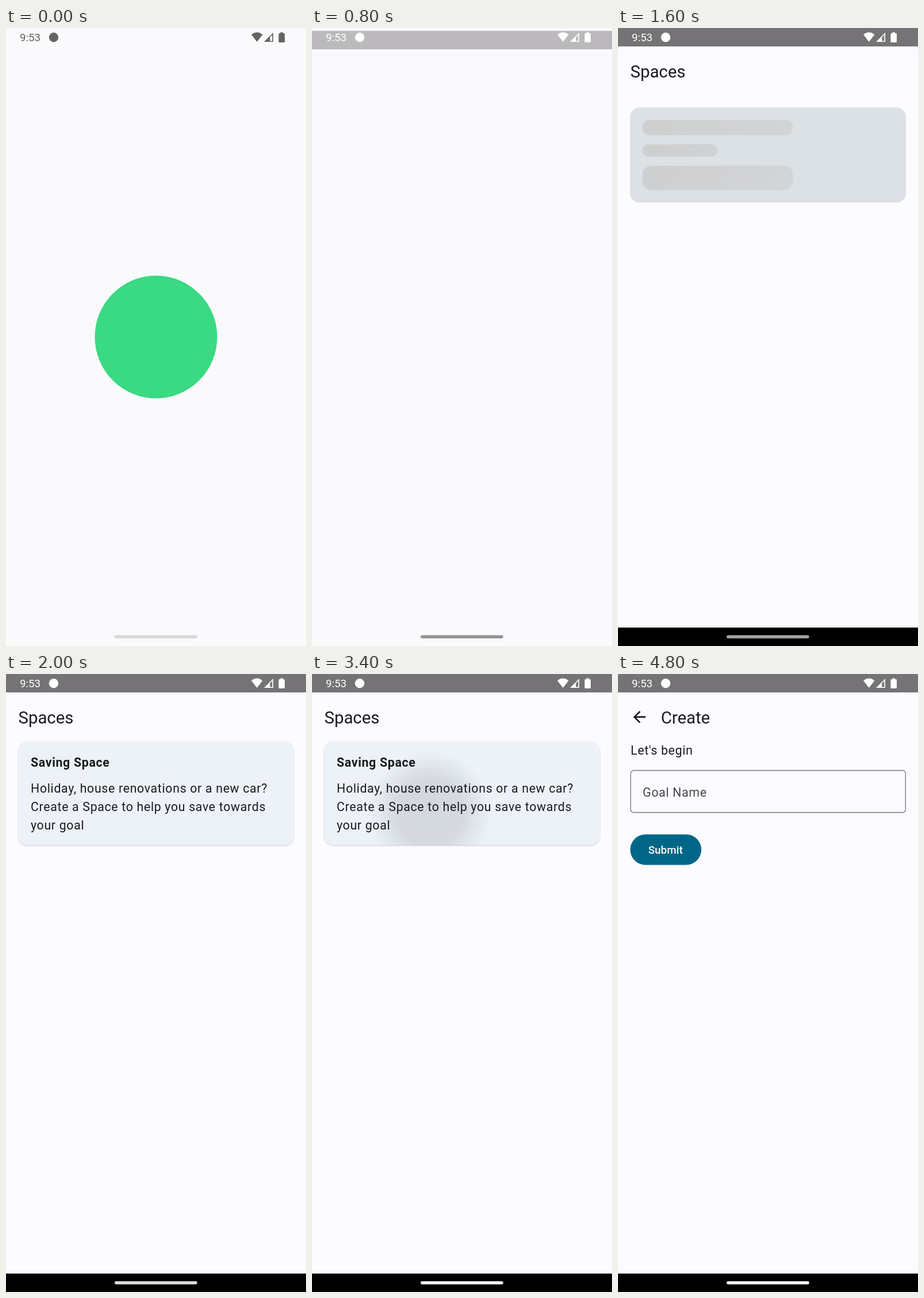
These frames come from a looping animation (522x1073 px, 5 s). An HTML page:

```html
<!DOCTYPE html>
<html lang="en">
<head>
<meta charset="utf-8">
<title>Spaces</title>
<style>
  html, body { margin: 0; width: 100%; height: 100%; overflow: hidden; background: #fcfbff; }
  svg { display: block; width: 100vw; height: 100vh; }
  text { font-family: Roboto, "Noto Sans", sans-serif; fill: #1a1b1e; white-space: pre; }
  .head { font-size: 29.33px; }
  .body { font-size: 21.33px; letter-spacing: .667px; }
  .bold { font-weight: 700; }
  .hint { fill: #41484d; }
  .label { font-size: 18.67px; font-weight: 500; letter-spacing: .13px; fill: #fff; text-anchor: middle; }
  .clock { font-size: 18.67px; fill: inherit; }
  .card { filter: drop-shadow(0 1px 1.2px rgba(0, 0, 0, .2)); }
</style>
</head>
<body>
<svg viewBox="0 0 522 1073" preserveAspectRatio="none">
  <defs>
    <clipPath id="cardClip"><rect x="21" y="117.5" width="480" height="180" rx="16"/></clipPath>
    <radialGradient id="rippleFill">
      <stop offset="0" stop-color="#1a1b1e" stop-opacity=".12"/>
      <stop offset=".55" stop-color="#1a1b1e" stop-opacity=".115"/>
      <stop offset=".78" stop-color="#1a1b1e" stop-opacity=".055"/>
      <stop offset="1" stop-color="#1a1b1e" stop-opacity="0"/>
    </radialGradient>
  </defs>

  <rect width="522" height="1073" fill="#fcfbff"/>

  <g id="spaces">
    <text class="head" x="21.5" y="86">Spaces</text>
    <g id="skeleton">
      <rect x="21" y="138" width="480" height="165" rx="16" fill="#dce1e6"/>
    </g>
    <g id="offer">
      <rect class="card" x="21" y="117.5" width="480" height="179.5" rx="16" fill="#edf2f9"/>
      <g clip-path="url(#cardClip)"><circle id="ripple" cx="205" cy="240" fill="url(#rippleFill)"/></g>
      <text class="body bold" x="43" y="161">Saving Space</text>
      <text class="body" x="43" y="205.5">Holiday, house renovations or a new car?</text>
      <text class="body" x="43" y="237.5">Create a Space to help you save towards</text>
      <text class="body" x="43" y="269.5">your goal</text>
    </g>
  </g>

  <g id="create">
    <path transform="translate(21.3 58.7) scale(1.333)" fill="#1a1b1e"
      d="M20 11H7.83l5.59-5.59L12 4l-8 8 8 8 1.41-1.41L7.83 13H20z"/>
    <text class="head" x="74.7" y="86">Create</text>
    <text class="body" x="22" y="140">Let's begin</text>
    <rect x="22" y="167.5" width="478.3" height="73" rx="5.3" fill="none" stroke="#71787e" stroke-width="1.33"/>
    <text class="body hint" x="43" y="213">Goal Name</text>
    <rect x="21.3" y="278.5" width="123.7" height="53" rx="26.5" fill="#006688"/>
    <text class="label" x="82.8" y="312">Submit</text>
  </g>

  <g id="splash">
    <rect width="522" height="1073" fill="#faf9fc"/>
    <circle id="emblem" cx="261" cy="536.5" r="106.5" fill="#3ad983"/>
  </g>

  <rect id="statusBar" width="522" height="32" fill="#757376"/>
  <g id="status">
    <text class="clock" x="24" y="23">9:53</text>
    <circle cx="83" cy="16.3" r="8.2"/>
    <path d="M427 11.5Q436.7 3.7 446.4 11.5L436.7 24Z"/>
    <path fill-rule="evenodd" d="M465 8V24H449ZM463.3 12L459.3 16V22.4H463.3Z"/>
    <path d="M477.3 7.5H482V9.2H484Q485 9.2 485 10.2V24Q485 25 484 25H475.4Q474.4 25 474.4 24V10.2Q474.4 9.2 475.4 9.2H477.3Z"/>
  </g>

  <rect id="navBar" y="1041" width="522" height="32"/>
  <rect id="handle" x="189" y="1054.3" width="143.7" height="5.4" rx="2.7"/>
</svg>

<script>
const LOOP = 5000, STEP = 100;
const NS = 'http://www.w3.org/2000/svg';
const $ = id => document.getElementById(id);
const set = (el, attrs) => { for (const k in attrs) el.setAttribute(k, attrs[k]); return el; };
const make = (tag, parent, attrs) => parent.appendChild(set(document.createElementNS(NS, tag), attrs));
const clamp = v => Math.max(0, Math.min(1, v));
const gray = v => `rgb(${v},${v},${v})`;

// Linear interpolation through [time, value] pairs.
function track(t, keys) {
  if (t <= keys[0][0]) return keys[0][1];
  for (let i = 1; i < keys.length; i++) {
    const [t0, a] = keys[i - 1], [t1, b] = keys[i];
    if (t <= t1) return a + (b - a) * (t - t0) / (t1 - t0);
  }
  return keys[keys.length - 1][1];
}

// cubic-bezier(.4, 0, .2, 1)
function ease(x) {
  let lo = 0, hi = 1;
  for (let i = 0; i < 24; i++) {
    const s = (lo + hi) / 2, r = 1 - s;
    if (1.2 * r * r * s + .6 * r * s * s + s * s * s < x) lo = s; else hi = s;
  }
  return lo * lo * (3 - 2 * lo);
}

const progress = (t, start, length) => ease(clamp((t - start) / length));

const bars = [[159.5, 262, 26.5, 13.2], [202, 131, 21.3, 10.6], [239, 262, 42.7, 16]];
const shimmers = bars.map(([y, width, height, rx], i) => {
  const g = make('linearGradient', document.querySelector('defs'),
    { id: 'shimmer' + i, gradientUnits: 'userSpaceOnUse', x1: 42.5, y1: y });
  [.9, .4, .9].forEach((a, n) =>
    make('stop', g, { offset: n / 2, 'stop-color': '#ccc', 'stop-opacity': a }));
  make('rect', $('skeleton'), { x: 42.5, y, width, height, rx, fill: `url(#shimmer${i})` });
  return { g, y };
});

// Status bar, splash and navigation bar
const EMBLEM = [[600, 1], [700, .35], [800, 0]];
const COVER = [[800, 1], [900, .35], [1000, 0]];
const BAR_ALPHA = [[600, 0], [700, .15], [800, .48], [900, .85], [1000, 1]];
const BAR_SHIFT = [[700, 14], [800, 5], [900, 1], [1000, 0]];
const ICONS = [[600, 100], [700, 180], [800, 255]];
const NAV = [[800, 0], [900, .65], [1000, 1]];
const HANDLE = [[0, 216], [600, 148], [800, 148], [900, 84], [1000, 46],
  [1700, 184], [1800, 184], [2000, 221], [2300, 236], [2500, 236], [2600, 240]];
const RIPPLE_SIZE = [[3300, 30], [3400, 107], [3500, 560]];
const RIPPLE_ALPHA = [[3300, 0], [3400, 1], [3500, .75], [3600, 0]];

function draw(t) {
  const loaded = t >= 1900;
  set($('splash'), { opacity: track(t, COVER) });
  set($('emblem'), { opacity: track(t, EMBLEM) });
  set($('statusBar'), { y: track(t, BAR_SHIFT), opacity: track(t, BAR_ALPHA) });
  set($('status'), { fill: gray(track(t, ICONS)) });
  set($('navBar'), { opacity: track(t, NAV) });
  set($('handle'), { fill: gray(track(t, HANDLE)) });

  const reach = 1 + 482 * progress(t, 710, 1200);
  for (const { g, y } of shimmers) set(g, { x2: 42.5 + reach, y2: y + reach });
  set($('skeleton'), { opacity: loaded ? 0 : 1 });
  set($('offer'), { opacity: loaded ? 1 : 0 });
  set($('ripple'), { r: track(t, RIPPLE_SIZE), opacity: track(t, RIPPLE_ALPHA) });

  const fade = progress(t, 3930, 700);
  set($('spaces'), { opacity: 1 - fade });
  set($('create'), { opacity: fade });
}

const origin = performance.now();
function tick() {
  const t = (performance.now() - origin) % LOOP;
  draw(Math.floor(t / STEP) * STEP);
  requestAnimationFrame(tick);
}
tick();
</script>
</body>
</html>
```
